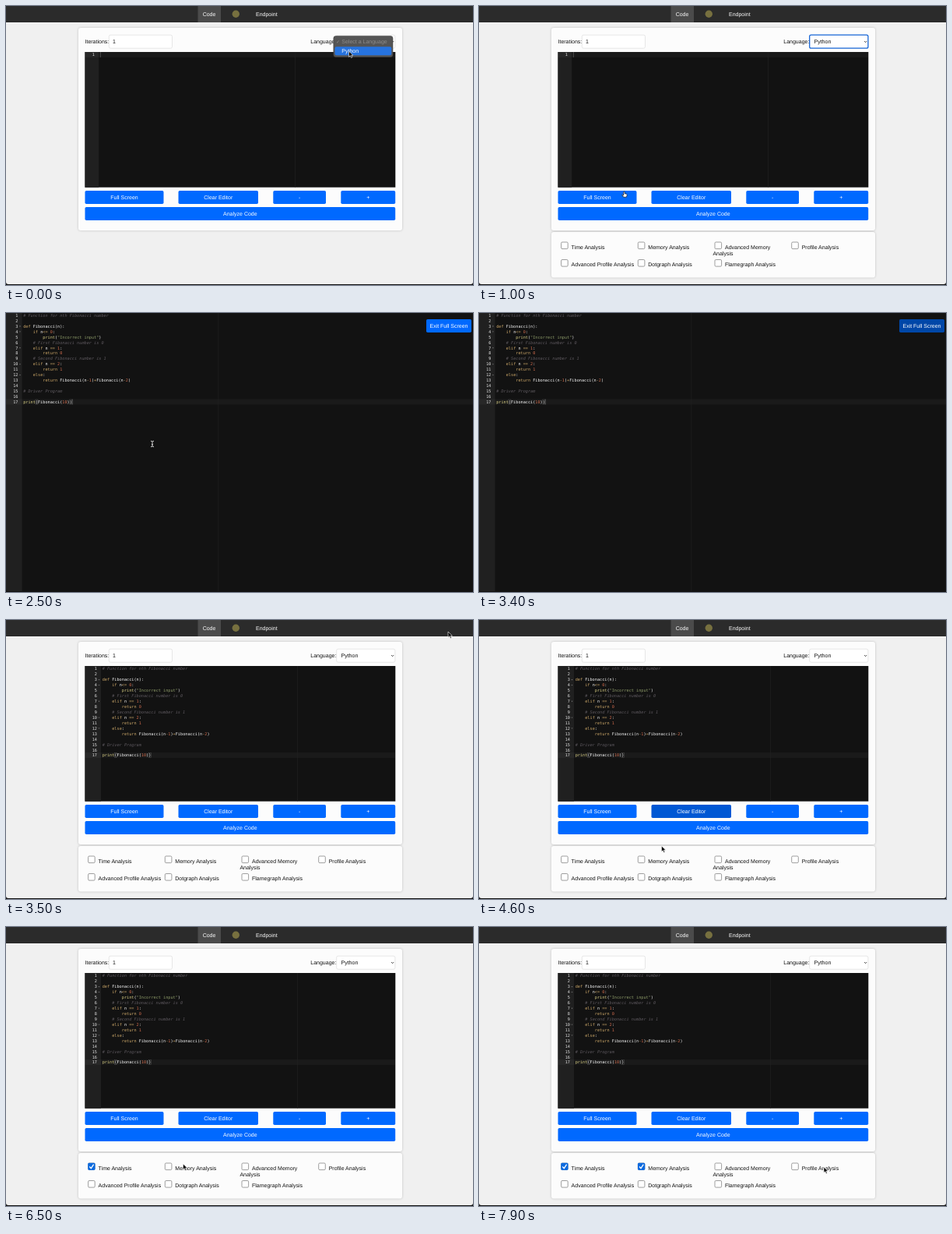
Write an HTML page that moves like this. It is 600 px wide and 358 px high and loops after 8 s.

```html
<!DOCTYPE html>
<html lang="en">
<head>
<meta charset="utf-8">
<title>Code analyzer</title>
<style>
  html, body { margin: 0; width: 100%; height: 100%; overflow: hidden; background: #f0f0f0; }
  svg { display: block; width: 600px; height: 358px; }
  text { font: 7px "Liberation Sans", Arial, sans-serif; fill: #111; text-rendering: geometricPrecision; }
  .mid { text-anchor: middle; }
  .light { fill: #fff; }
  .code text { font: 5.21px "DejaVu Sans Mono", monospace; fill: #f8f8f8; }
  .code .num { text-anchor: end; fill: #e2e2e2; }
  .kw { fill: #cda869; }
  .fn { fill: #dad085; }
  .lit { fill: #cf6a4c; }
  .str { fill: #8f9d6a; }
  .com { fill: #5f5a60; font-style: italic; }
  .card { fill: #fcfcfc; filter: drop-shadow(0 0 1.5px #0003); }
  .field { fill: #fff; stroke: #ddd; stroke-width: .7; }
</style>
</head>
<body>
<svg id="stage" viewBox="0 0 600 358"></svg>
<script>
const CHAR = 3.136, LINE = 6.94;
const program = `# Function for nth Fibonacci number

def Fibonacci(n):
    if n<= 0:
        print("Incorrect input")
    # First Fibonacci number is 0
    elif n == 1:
        return 0
    # Second Fibonacci number is 1
    elif n == 2:
        return 1
    else:
        return Fibonacci(n-1)+Fibonacci(n-2)

# Driver Program

print(Fibonacci(10))`.split('\n');

const rect = (x, y, w, h, attrs) => `<rect x="${x}" y="${y}" width="${w}" height="${h}" ${attrs}/>`;
const text = (x, y, s, attrs = '') => `<text x="${x}" y="${y}" ${attrs}>${s}</text>`;
const group = (id, body) => `<g id="${id}">${body}</g>`;

const tokens = /(#.*)|(".*")|\b(def|if|elif|else|return)\b|\b(print)\b|(\d+)|([<=+-]+)/g;
const kinds = ['com', 'str', 'kw', 'fn', 'lit', 'kw'];
function highlight(line) {
  return line.replace(tokens, (match, ...parts) => {
    const kind = kinds[parts.slice(0, 6).findIndex(Boolean)];
    return `<tspan class="${kind}">${match.replace('<', '&lt;')}</tspan>`;
  });
}

function editor(id, x, y, w, h, lines) {
  const filled = lines.length > 1;
  const gutter = filled ? 20.5 : 17.7, left = x + gutter + 1.7;
  const last = lines.length - 1, top = y + last * LINE;
  const caret = left + lines[last].length * CHAR;
  let out = rect(x, y, w, h, 'fill="#121212"') + rect(x, y, gutter, h, 'fill="#202020"')
    + rect(x, top, w, LINE, 'fill="#fff" fill-opacity=".035"')
    + rect(left + 80 * CHAR - .5, y, .6, h, 'fill="#222"');
  lines.forEach((line, i) => {
    const base = y + i * LINE + 5.4, indent = line.search(/\S|$/);
    out += text(x + (filled ? 15.4 : 12.4), base, i + 1, 'class="num"')
      + text(left + indent * CHAR, base, highlight(line.trim()));
    if (line.endsWith(':')) {
      out += `<path d="M${x + 17} ${base - 2.2}h2l-1 1.3z" fill="#777"/>`;
    }
  });
  if (filled) {
    for (const col of [5, 19]) {
      out += rect(left + col * CHAR, top + .5, CHAR, LINE - 1, 'fill="none" stroke="#fff" stroke-opacity=".25" stroke-width=".5"');
    }
  }
  out += rect(caret, top, .6, LINE, 'class="caret" fill="#a7a7a7" fill-opacity=".6"');
  return `<g id="${id}" class="code">${out}</g>`;
}

const button = (id, x, y, w, label) =>
  rect(x, y, w, 17, `id="${id}" rx="1.8" fill="#0069ff"`) + text(x + w / 2, y + 10.7, label, 'class="mid light"');

function option(i, label, extra = '') {
  const x = 105.6 + i % 4 * 98.7, y = i < 4 ? 303 : 325.5;
  return rect(x, y, 8.6, 8.6, 'rx="1.4" fill="#fff" stroke="#767676" stroke-width=".7"')
    + text(x + 13, y + 8.8, label) + text(x - 2.6, y + 16.6, extra);
}
const tick = (id, x) => group(id, rect(x, 302.7, 9.2, 9.2, 'rx="1.4" fill="#0b6ae0"')
  + `<path d="M${x + 2} 307.5l2 2.2 3.3-5" fill="none" stroke="#fff" stroke-width="1.3"/>`);

const page = rect(0, 0, 600, 358, 'fill="#f0f0f0"')
  + rect(0, 0, 600, 21, 'fill="#2b2b2b"') + rect(246.5, 0, 29.5, 21, 'fill="#4b4b4b"')
  + text(261, 12.5, 'Code', 'class="mid light"') + text(321, 12.5, 'Endpoint', 'class="light"')
  + '<circle cx="295.3" cy="10.3" r="4.7" fill="#77703f"/>'
  + rect(93, 28, 416, 260, 'rx="3" class="card"')
  + text(101.5, 48, 'Iterations:') + rect(132.3, 37.2, 81.2, 17, 'rx="2" class="field"') + text(137, 48, '1')
  + text(391.3, 48, 'Language:') + rect(424.7, 37.2, 75.2, 17, 'id="select" rx="2" class="field"')
  + '<path d="M495 45l1.6 1.7 1.6-1.7" fill="none" stroke="#222" stroke-width=".8"/>'
  + group('chosen', text(430.5, 48, 'Python'))
  + editor('smallEmpty', 101.5, 59, 398.8, 173.7, ['']) + editor('smallCode', 101.5, 59, 398.8, 173.7, program)
  + button('fullBtn', 101.5, 237, 101, 'Full Screen') + button('clearBtn', 221.5, 237, 102.5, 'Clear Editor')
  + button('minus', 343.3, 237, 67.7, '-') + button('plus', 430.3, 237, 69.9, '+')
  + button('analyze', 101.5, 258, 398.7, 'Analyze Code')
  + group('panel', rect(93, 290, 416, 58.5, 'rx="3" class="card"')
    + option(0, 'Time Analysis') + option(1, 'Memory Analysis') + option(2, 'Advanced Memory', 'Analysis')
    + option(3, 'Profile Analysis') + option(4, 'Advanced Profile Analysis')
    + option(5, 'Dotgraph Analysis') + option(6, 'Flamegraph Analysis')
    + tick('timeTick', 105.3) + tick('memoryTick', 204))
  + group('menu', rect(420.8, 38.5, 76.2, 27, 'rx="3" fill="#555" stroke="#3c3c3c" stroke-width=".5"')
    + text(424, 48.2, '✓', 'style="font-size:6px;fill:#8c8c8c"')
    + text(431.3, 48.2, 'Select a Language', 'style="fill:#8c8c8c"')
    + rect(422.5, 52.3, 72.8, 11, 'rx="2" fill="#2673df"') + text(431.3, 60.2, 'Python', 'class="light"'));

const full = editor('fullEmpty', 0, -.5, 600, 358.5, ['']) + editor('fullCode', 0, -.5, 600, 358.5, program)
  + button('exitBtn', 540, 8, 58, 'Exit Full Screen');

const pointers = group('arrow', '<path d="M0 0V7.3L1.8 5.7 3 8.4 4.3 7.9 3.1 5.2H5.4Z" fill="#000" stroke="#fff" stroke-width=".6"/>')
  + group('hand', '<path d="M-.7.4Q0-.6.7.4V2.7L3 3.2Q3.9 3.5 3.7 4.7L3 7.2H-.7L-2.7 4.6Q-2.5 3.7-1.5 4.3L-.7 5Z" fill="#fff" stroke="#111" stroke-width=".7"/>')
  + group('beam', '<path d="M-2-3.7Q0-3.7 0-2.7Q0-3.7 2-3.7M0-2.7V2.7M-2 3.7Q0 3.7 0 2.7Q0 3.7 2 3.7M-1 .8H1" fill="none" stroke="#e8e8e8" stroke-width=".9"/>');

const stage = document.getElementById('stage');
stage.innerHTML = group('page', page) + group('full', full)
  + '<path d="M0 354Q0 357 3 357H597Q600 357 600 354V358H0Z" fill="#111"/>' + group('pointer', pointers);

const el = id => document.getElementById(id);
const show = (id, on) => { el(id).style.display = on ? '' : 'none'; };
const clamp = v => Math.max(0, Math.min(1, v));

// Pointer path: time, x, y
const path = [
  [0, 440.5, 58], [250, 440.5, 58], [980, 186.5, 238], [1250, 186.5, 238], [1500, 188, 226],
  [1700, 188, 168], [2500, 188, 168], [3000, 568, 15], [3550, 568, 15], [4150, 262, 243],
  [4350, 256, 248], [4600, 234.5, 290], [4800, 233, 295], [5000, 233, 295], [5400, 110, 307],
  [5900, 110, 307], [6500, 227.5, 304], [6800, 209, 307], [7100, 209, 307], [7600, 472, 308],
  [7900, 443, 308], [8000, 443, 308]
];
function pointerAt(t) {
  const i = path.findIndex(p => p[0] > t);
  const [t0, x0, y0] = path[i - 1], [t1, x1, y1] = path[i];
  const u = (t - t0) / (t1 - t0), k = u * u * (3 - 2 * u);
  return [x0 + (x1 - x0) * k, y0 + (y1 - y0) * k];
}

// Buttons fade to their hover colour and back in 300 ms
function hover(id, t, ...spans) {
  const k = Math.max(...spans.map(([a, b]) => Math.min(clamp((t - a) / 300), 1 - clamp((t - b) / 300))));
  el(id).setAttribute('fill', `rgb(0,${105 - 34 * k},${255 - 87 * k})`);
}

function render(t) {
  const isFull = t >= 1280 && t < 3500, hasCode = t >= 2000, picked = t >= 300;
  show('page', !isFull);
  show('full', isFull);
  for (const size of ['small', 'full']) {
    show(size + 'Empty', !hasCode);
    show(size + 'Code', hasCode);
  }
  show('menu', !picked);
  show('chosen', picked);
  show('panel', picked);
  show('timeTick', t >= 5600);
  show('memoryTick', t >= 7000);
  const focused = picked && t < 1280;
  el('select').style.stroke = focused ? '#1766d6' : '';
  el('select').style.strokeWidth = focused ? 1.3 : '';
  const caretOn = t < 1300 || (t < 3500 && t % 1000 >= 400);
  document.querySelectorAll('.caret').forEach(c => { c.style.display = caretOn ? '' : 'none'; });

  hover('fullBtn', t, [1000, 1350]);
  hover('exitBtn', t, [1000, 1350], [2950, 3500]);
  hover('clearBtn', t, [4080, 4450]);

  const [x, y] = pointerAt(t);
  const inside = (a, b, c, d) => x >= a && x <= c && y >= b && y <= d;
  const onButton = isFull ? inside(540, 8, 598, 25)
    : inside(101, 237, 202, 254) || inside(221, 237, 324, 254) || inside(101, 258, 500, 275);
  const inEditor = isFull || (picked && inside(101, 59, 500, 233));
  const kind = onButton ? 'hand' : inEditor ? 'beam' : 'arrow';
  for (const id of ['arrow', 'hand', 'beam']) show(id, id === kind);
  show('pointer', !(t >= 1750 && t < 2500) && !(t >= 3350 && t < 3500));
  el('pointer').setAttribute('transform', `translate(${x} ${y})`);
}

function frame() {
  render(performance.now() % 8000);
  requestAnimationFrame(frame);
}
frame();
</script>
</body>
</html>
```
